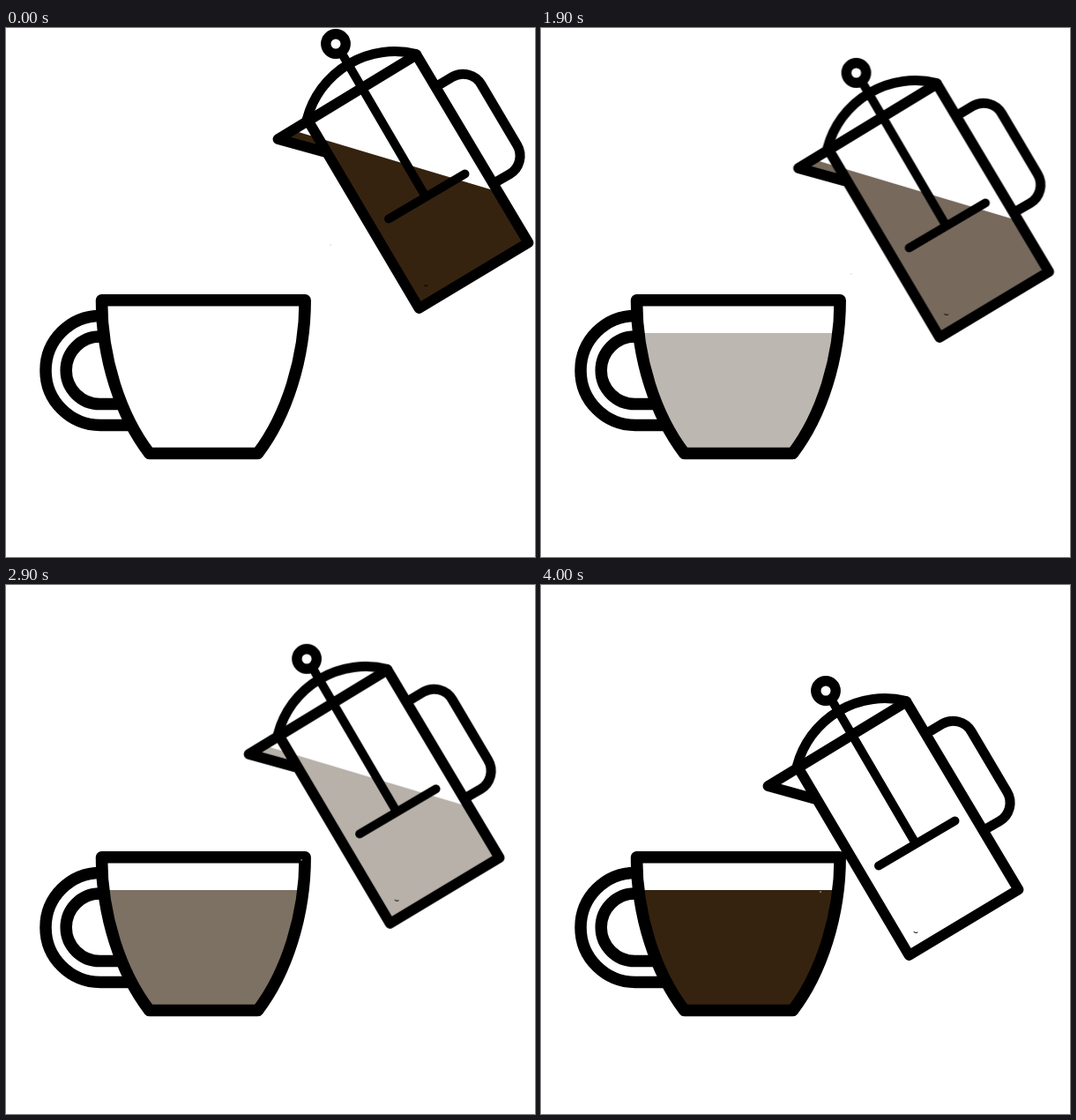
Recreate the animation shown at these times as an HTML page. Size 600 by 600 pixels, loop 5000 ms.

```html
<!DOCTYPE html>
<html lang="en">
<head>
<meta charset="utf-8">
<title>Coffee press and cup</title>
<style>
  html, body { margin: 0; width: 100%; height: 100%; overflow: hidden; background: #fff; }
  svg { display: block; width: 100%; height: 100%; }
  .line { fill: none; stroke: #000; stroke-linecap: round; stroke-linejoin: round; }
  .coffee { fill: #36230f; }
</style>
</head>
<body>
<svg viewBox="0 0 600 600">
  <defs>
    <clipPath id="level"><rect x="100" y="346" width="250" height="140"/></clipPath>
    <path id="bowl" d="M108.500 308.800H339.200C339.200 375 318 440 285.500 482.600H162.700C130 440 108.500 375 108.500 308.800Z"/>
  </defs>

  <g id="cup">
    <g clip-path="url(#level)"><use href="#bowl" id="cupFill" class="coffee"/></g>
    <g class="line" stroke-width="13.500">
      <path stroke-linecap="butt" d="M108 326.400H107A62 62 0 0 0 107 450.400H140M108 350H106.500A38.300 38.300 0 0 0 106.500 426.600H130"/>
      <use href="#bowl"/>
    </g>
  </g>

  <g id="press">
    <path id="pressFill" class="coffee" d="M321 122 330 117.500 556 185 592.500 243.500 468.500 318 361 140 321 130Z"/>
    <g class="line" stroke-width="11">
      <path stroke-width="11.800" d="M361 140.500 308.500 126 465.500 30.500 592.500 243.500 468.500 318 342 104"/>
      <path d="M341.500 103A103 103 0 0 1 465.500 29.500"/>
      <path stroke-width="10" d="M381 29 474 188M434 216.500 520.500 165.500"/>
      <path d="M492 64 506.200 55.600A24 24 0 0 1 539.100 64.100L579.700 132.800A24 24 0 0 1 571.200 165.700L556 174.500"/>
      <circle cx="374" cy="18" r="11.200" stroke-width="11.400"/>
      <path stroke-width="1" d="M474 291.500 476 292.500 478 292"/>
    </g>
    <circle cx="368" cy="246" r="0.800" fill="#ccc"/>
  </g>
</svg>
<script>
  const LOOP = 5000, START = 1000, STEP = 100, COUNT = 31;

  // Holds, moves in even steps, then holds again
  function stepped(id, prop, from, to) {
    document.getElementById(id).animate([
      { [prop]: from, offset: 0 },
      { [prop]: from, offset: START / LOOP, easing: `steps(${COUNT}, start)` },
      { [prop]: to, offset: (START + COUNT * STEP) / LOOP },
      { [prop]: to, offset: 1 }
    ], { duration: LOOP, iterations: Infinity });
  }

  stepped('press', 'transform', 'translate(0px, 0px)', 'translate(-51px, 102px)');
  stepped('pressFill', 'opacity', 1, 0);
  stepped('cupFill', 'opacity', 0, 1);
</script>
</body>
</html>
```
